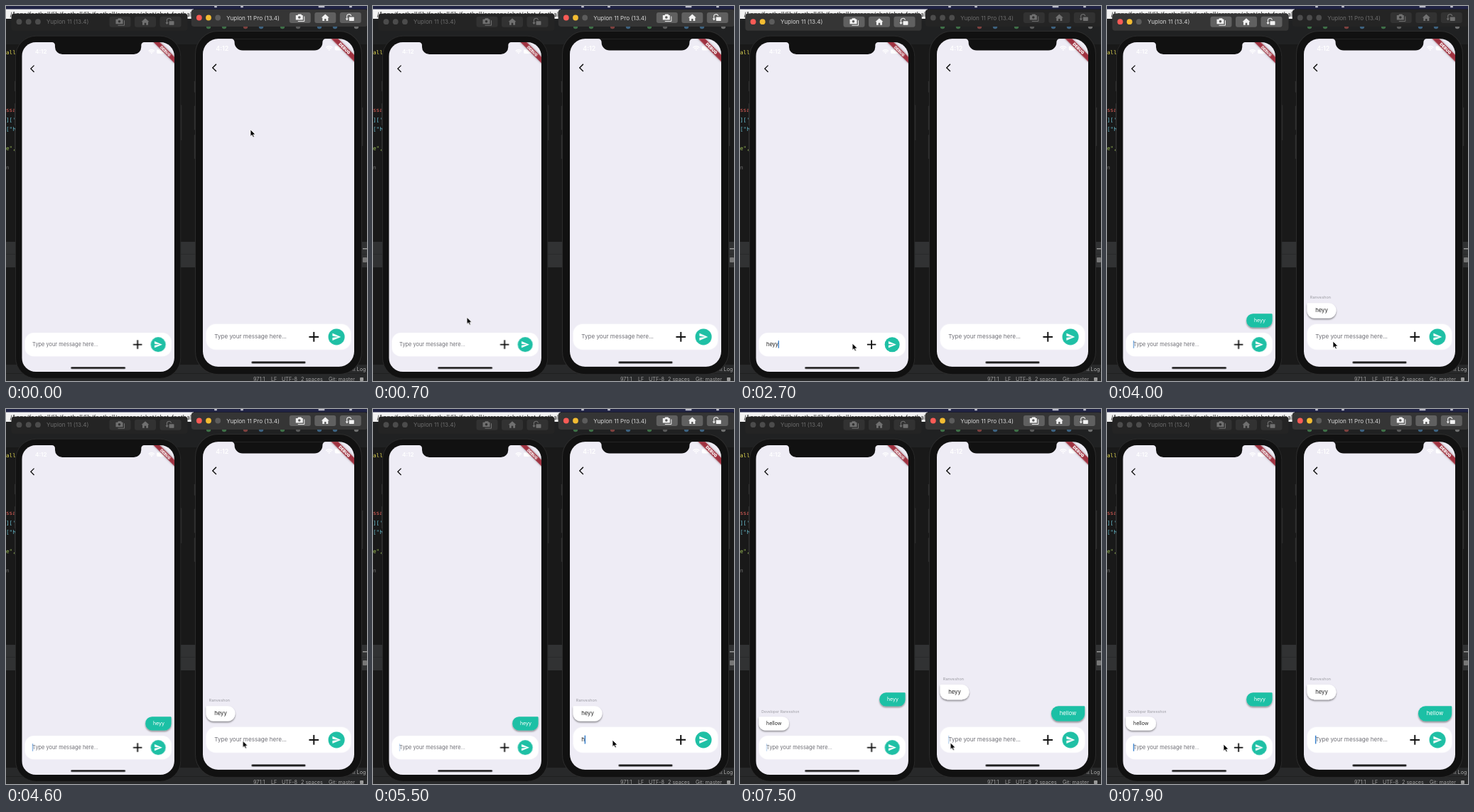
Animation, 508 px wide and 528 px high, one loop 8000 ms. Source, as an HTML page:

```html
<!DOCTYPE html>
<html lang="en">
<head>
<meta charset="utf-8">
<title>Two phones chatting</title>
<style>
html, body { margin: 0; width: 100%; height: 100%; overflow: hidden; background: #191919; }
svg { display: block; width: 508px; height: 528px; font-family: Inter, "Open Sans", sans-serif; }
.code { font: 7.6px "DejaVu Sans Mono", monospace; }
.step { animation: 8s step-end infinite; }
.hint { fill: #6f6f76; animation: 8s linear infinite; }
.cursor { animation: travel 8s linear infinite; }

.left .front { animation-name: frontLeft; }
.right .front { animation-name: frontRight; }
.left .hint { animation-name: hintLeft; }
.right .hint { animation-name: hintRight; }
.left .first { animation-name: firstLeft; }
.right .first { animation-name: firstRight; }
.left .second { animation-name: secondLeft; }
.right .second { animation-name: secondRight; }

@keyframes frontLeft { 0% { opacity: 0 } 11.25% { opacity: 1 } 56.25%, 100% { opacity: 0 } }
@keyframes frontRight { 0% { opacity: 1 } 11.25% { opacity: 0 } 56.25%, 100% { opacity: 1 } }
@keyframes hintLeft { 0%, 19.2% { opacity: 1 } 21%, 41.2% { opacity: 0 } 41.25%, 100% { opacity: 1 } }
@keyframes hintRight { 0%, 65% { opacity: 1 } 67%, 89.9% { opacity: 0 } 90%, 100% { opacity: 1 } }
@keyframes firstLeft {
  0% { opacity: 0; transform: none }
  41.25% { opacity: 1; transform: none }
  93.75%, 100% { opacity: 1; transform: translateY(-65.5px) }
}
@keyframes firstRight {
  0% { opacity: 0; transform: none }
  43.75% { opacity: 1; transform: none }
  90%, 100% { opacity: 1; transform: translateY(-53px) }
}
@keyframes secondLeft { 0% { opacity: 0 } 93.75%, 100% { opacity: 1 } }
@keyframes secondRight { 0% { opacity: 0 } 90%, 100% { opacity: 1 } }
@keyframes travel {
  0%, 1.25% { transform: translate(344px, 174px); animation-timing-function: ease-in-out }
  11.25%, 31.25% { transform: translate(101px, 477px) }
  33.75% { transform: translate(158px, 475px) }
  38.75%, 41.25% { transform: translate(211px, 475px) }
  50%, 52.5% { transform: translate(318px, 472px) }
  58.75%, 78.75% { transform: translate(337px, 466px) }
  83.75% { transform: translate(417px, 474px) }
  86.25% { transform: translate(455px, 477px) }
  88.75%, 90.6% { transform: translate(462px, 467px); animation-timing-function: ease-out }
  98.75%, 100% { transform: translate(164px, 472px) }
}
</style>
</head>
<body>
<svg id="stage" viewBox="0 0 508 528"></svg>
<script>
const stage = document.getElementById('stage');
const GREEN = '#1fc0a5', SCREEN = '#eeecf5', INK = '#111';

const box = (x, y, w, h, fill, r = 0, more = '') =>
  `<rect x="${x}" y="${y}" width="${w}" height="${h}" rx="${r}" fill="${fill}" ${more}/>`;
const dot = (x, y, r, fill) => `<circle cx="${x}" cy="${y}" r="${r}" fill="${fill}"/>`;
const text = (x, y, size, fill, s, more = '') =>
  `<text x="${x}" y="${y}" font-size="${size}" fill="${fill}" xml:space="preserve" ${more}>${s}</text>`;
const line = (d, color, width, more = '') =>
  `<path d="${d}" fill="none" stroke="${color}" stroke-width="${width}" ${more}/>`;

function editor() {
  const code = [
    [68, '#d9d04f', 'all'], [149, '#e0605a', 'ssa'], [163, '#6cc3d5', "]['"],
    [176, '#6cc3d5', '["h'], [203, '#9fc25a', 'e",'], [230, '#6a6a6a', 'n']
  ];
  const status = [[348, '971:1'], [373, 'LF'], [388, 'UTF-8'], [415, '2 spaces'], [454, 'Git: master']];
  const tools = ['#4f9a5b', '#4f9a5b', '#b0524d', '#4d86b3', '#4f9a5b', '#777', '#4d86b3', '#4d86b3', '#999'];
  return box(0, 0, 508, 528, '#191919')
    + box(0, 17, 508, 37, '#202122')
    + box(0, 4, 264, 14, '#f2f2f2')
    + text(263, 15, 8.5, '#222', '/Apps/football/lib/football/lib/football/screens/chat/chat_football', 'text-anchor="end"')
    + box(0, 0, 508, 4.5, '#202344')
    + [[295, 4], [332, 4], [444, 9], [485, 4]].map(([x, w]) => box(x - w / 2, 0, w, 2.2, '#b9bac8', 1)).join('')
    + `<g opacity=".65">${tools.map((c, i) => dot(285 + i * 26 - (i % 2) * 4, 29, 3.2, c)).join('')}</g>`
    + code.map(([y, c, s]) => text(0, y, 7.6, c, s, 'class="code"')).join('')
    + box(0, 332, 508, 36, '#313233') + box(0, 349, 508, 1, '#292a2b')
    + box(502, 341, 6, 1.5, '#999') + box(502, 354, 6, 7, '#777', 1)
    + box(0, 505, 508, 23, '#28292a') + box(0, 517, 508, 1, '#202020')
    + text(485, 514, 7.2, '#aaa', 'nt Log')
    + status.map(([x, s]) => text(x, 527.5, 7.2, '#a0a0a0', s)).join('')
    + box(498, 523, 5, 5, '#999', 1);
}

// Window title bar in one of its two looks; (x, y) is the first light.
function titleBar(x, y, name, on) {
  const ink = on ? '#f2f2f2' : '#707070', bg = on ? '#353535' : '#242424';
  const face = on ? '#606060' : '#323232';
  const lights = on ? ['#fc5b56', '#f4bc32', '#5c5c5c'] : ['#4c4c4c', '#4c4c4c', '#4c4c4c'];
  const icons = [
    `<path d="M-6-3.5h2.5l1-1.5h4l1 1.5H4V3H-6z" fill="${ink}"/>${dot(-1, -.5, 1.8, face)}`
      + line('M6-2V5H-3', ink, 1),
    `<path d="M-5.5 0 0-5 5.5 0H4V4.5H1.2V1.5H-1.2V4.5H-4V0z" fill="${ink}"/>`,
    box(-2, -1, 7, 5.5, ink, .8) + line('M-5 3V-1A3 3 0 0 1 1-2.5M-6.5 1-5 3-3.5 1', ink, 1.1)
  ];
  return box(x - 11, y - 11.5, 248, 24, bg, 4)
    + lights.map((c, i) => dot(x + i * 13.2, y, 3.9, c)).join('')
    + text(x + 38.5, y + 3, 8.15, on ? '#d6d6d6' : '#6c6c6c', name)
    + icons.map((icon, i) => box(x + 127 + i * 35.5, y - 7.5, 30, 15, face, 3)
      + `<g transform="translate(${x + 142 + i * 35.5} ${y})">${icon}</g>`).join('');
}

// A message, measured in points; sent ones sit right and are green.
function bubble(p, order, word, w, sent, from) {
  const x = sent ? p.w - 8.5 - w : 8, y = p.h - 158, h = 37.5, r = 18;
  const shape = sent
    ? `M${x + r} ${y}h${w - r - 2}q2 0 2 2v${h - r - 2}a${r} ${r} 0 0 1-${r} ${r}h${2 * r - w}a${r} ${r} 0 0 1-${r}-${r}v${2 * r - h}a${r} ${r} 0 0 1 ${r}-${r}z`
    : `M${x + 2} ${y}h${w - r - 2}a${r} ${r} 0 0 1 ${r} ${r}v${h - 2 * r}a${r} ${r} 0 0 1-${r} ${r}h${2 * r - w}a${r} ${r} 0 0 1-${r}-${r}v${r + 2 - h}q0-2 2-2z`;
  return `<g class="step ${order}"><path d="${shape}" fill="${sent ? GREEN : '#fff'}" filter="url(#drop)"/>`
    + text(x + 20.5, y + 23.5, 13.6, sent ? '#fff' : '#222', word)
    + (from ? text(15.5, y - 10.5, 9.6, '#98989f', from, 'letter-spacing=".2"') : '') + '</g>';
}

function statusBar(p) {
  const y = p.clock, x = p.w - 62;
  return text(p.ear, y, 15.5, '#fff', '4:12', 'font-weight="600" text-anchor="middle"')
    + line(`M${x - 8} ${y - 7}q8-7 16 0M${x - 5} ${y - 4}q5-4 10 0`, '#fff', 2.4) + dot(x, y - 1.5, 1.8, '#fff')
    + box(x + 14, y - 11, 22, 11, '#fff', 3);
}

function phone(p) {
  const { w, h, k, notch: n, depth: d } = p, mid = w / 2, a = mid - n, b = mid + n;
  const bez = p.bezel, low = p.low, hx = w * .357;
  const side = (x, y, len) => box(x, y, 2.4, len, '#303030', 1);
  const cy = h - 74;
  return `<g transform="translate(${p.x} ${p.y}) scale(${k})">`
    + side(-bez - 3, 105, 28) + side(-bez - 3, 166, 60) + side(-bez - 3, 238, 60) + side(w + bez + .6, 170, 96)
    + box(-bez, -bez, w + 2 * bez, h + bez + low, '#111', 56, 'stroke="#2c2c2c" stroke-width="1.8"')
    + `<clipPath id="clip-${p.side}">${box(0, 0, w, h, '#000', 38)}</clipPath>`
    + `<g clip-path="url(#clip-${p.side})">` + box(0, 0, w, h, SCREEN)
    + statusBar(p)
    + `<path transform="translate(22.5 60)" d="M11.67 3.87 9.9 2.1 0 12l9.9 9.9 1.77-1.77L3.54 12z" fill="${INK}"/>`
    + p.bubbles.map(args => bubble(p, ...args)).join('')
    + box(8, h - 106, w - 16, 64, '#fff', 24)
    + text(28.5, h - 70, 14.3, '#6f6f76', 'Type your message here...', 'class="hint"')
    + text(28.5, h - 70, 14.3, '#1a1a1a', '', 'class="typed"')
    + box(28, h - 85, 2.4, 21, '#2c78c8', 1, 'class="caret"')
    + line(`M${w - 112} ${cy}h24m-12-12v24`, INK, 3.5)
    + dot(w - 44, cy, 20.3, GREEN)
    + `<path transform="translate(${w - 56} ${cy - 12})" d="M2 21 23 12 2 3v7l15 2-15 2z" fill="#fff"/>`
    + box(mid - hx / 2, h - 13, hx, 5, INK, 2.5)
    + `<g transform="translate(${w} 0) rotate(45)">` + box(-42, 28, 84, 12, '#a03240', 0, 'filter="url(#glow)"')
    + text(0, 37.7, 10.2, '#fff', 'DEBUG', 'font-weight="900" text-anchor="middle"') + '</g>'
    + `<path fill="#111" d="M${a - 8}-2V0A8 8 0 0 1 ${a} 8V${d - 20}A20 20 0 0 0 ${a + 20} ${d}H${b - 20}A20 20 0 0 0 ${b} ${d - 20}V8A8 8 0 0 1 ${b + 8} 0V-2z"/>`
    + '</g></g>';
}

const device = p => `<g class="${p.side}">` + titleBar(...p.bar, p.name, false)
  + `<g class="step front">${titleBar(...p.bar, p.name, true)}</g>` + phone(p) + '</g>';

const phones = [{
  side: 'left', name: 'Yuplon 11 (13.4)', bar: [18.5, 22.2],
  x: 22.3, y: 51, w: 414, h: 895, k: .5185, bezel: 17, low: 18, notch: 117, depth: 33, clock: 31, ear: 52,
  bubbles: [['first', 'heyy', 70, true], ['second', 'hellow', 82, false, 'Developer Ranveshon']],
  focus: 1000, keys: [[1500, 'h'], [1700, 'he'], [1900, 'hey'], [2200, 'heyy'], [3300, '']]
}, {
  side: 'right', name: 'Yuplon 11 Pro (13.4)', bar: [271.8, 16.5],
  x: 277, y: 46.1, w: 375, h: 813, k: .568, bezel: 18.5, low: 19, notch: 109, depth: 29, clock: 29, ear: 48,
  bubbles: [['first', 'heyy', 72, false, 'Ranveshon'], ['second', 'hellow', 83, true]],
  focus: 4800, keys: [[5200, 'h'], [5600, 'he'], [5900, 'hel'], [6100, 'hell'], [6300, 'hello'], [6600, 'hellow'], [7200, '']]
}];

stage.innerHTML = `<defs>
  <filter id="drop" x="-20%" y="-30%" width="140%" height="180%">
    <feDropShadow dx="0" dy="3" stdDeviation="2" flood-opacity=".45"/></filter>
  <filter id="glow" x="-20%" y="-100%" width="140%" height="300%">
    <feDropShadow dx="0" dy="0" stdDeviation="3" flood-opacity=".4"/></filter></defs>`
  + editor() + phones.map(device).join('')
  + '<path class="cursor" d="M0 0V9.6L2.2 7.6 3.7 11 5.4 10.3 3.9 7H7z" fill="#000" stroke="#fff" stroke-width=".8"/>';

for (const p of phones) {
  p.typed = stage.querySelector(`.${p.side} .typed`);
  p.caret = stage.querySelector(`.${p.side} .caret`);
}

// Caret fades out, rests, then fades back in once a second.
function blink(t) {
  const s = t % 1000 / 1000;
  return s < .25 ? .7 - s * 2.8 : s < .4 ? 0 : Math.min(1, (s - .4) * 3);
}

function draw(now) {
  const t = now % 8000;
  for (const p of phones) {
    const word = p.keys.reduce((last, [at, s]) => t >= at ? s : last, '');
    if (p.typed.textContent !== word) p.typed.textContent = word;
    p.caret.setAttribute('x', 28 + (word ? p.typed.getComputedTextLength() : 0));
    p.caret.setAttribute('opacity', t < p.focus ? 0 : word ? 1 : blink(t));
  }
  requestAnimationFrame(draw);
}
requestAnimationFrame(draw);
</script>
</body>
</html>
```
